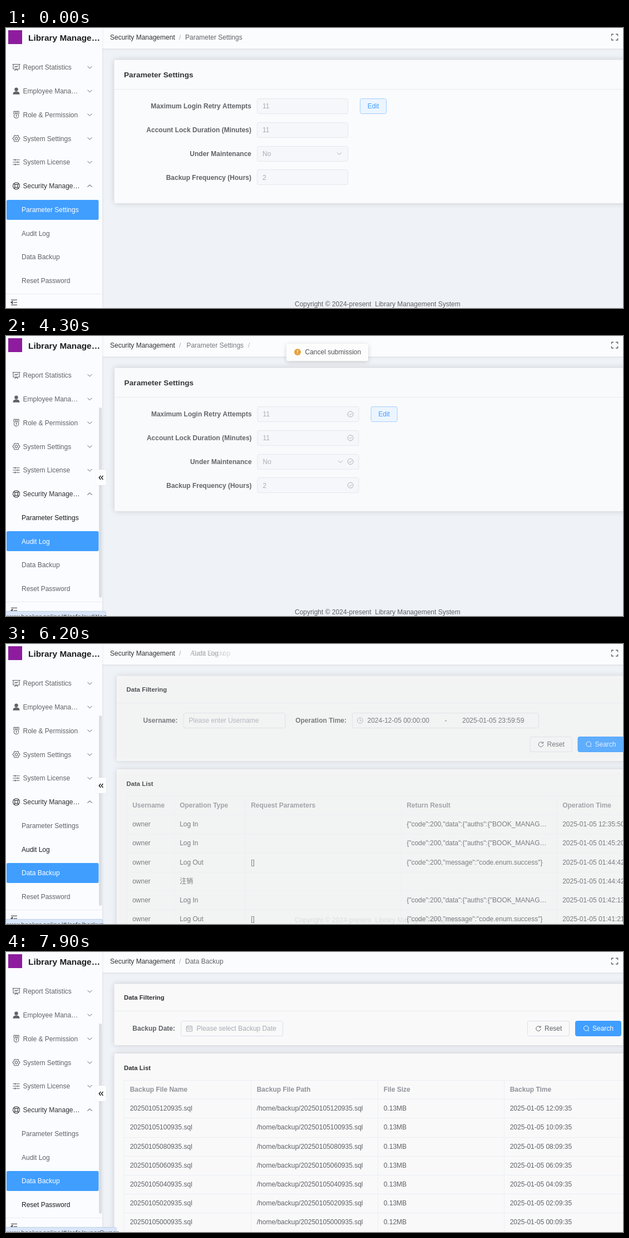
These frames come from a looping animation (1109 px wide and 505 px high, 8000 ms). An HTML page with a canvas:

```html
<!DOCTYPE html>
<html lang="en">
<head>
<meta charset="utf-8">
<title>Parameter Settings</title>
<style>
html, body { margin: 0; width: 100%; height: 100%; overflow: hidden; background: #eff2f6; }
canvas { display: block; width: 1109px; height: 505px; }
</style>
</head>
<body>
<canvas id="stage"></canvas>
<script>
const W = 1109, H = 505, LOOP = 8000, STEP = 100;
const canvas = document.getElementById('stage');
const ctx = canvas.getContext('2d');
const dpr = window.devicePixelRatio || 1;
canvas.width = W * dpr;
canvas.height = H * dpr;

const SANS = '"Liberation Sans", Arial, "Noto Sans CJK SC", "Noto Sans CJK", sans-serif';
const BLUE = '#409eff', INK = '#303133', BODY = '#606266', HINT = '#a8abb2';
const LINE = '#e4e7ed', EDGE = '#dcdfe6', GRID = '#eceef3';

const ICONS = {
  board: 'M-7 -5.5H7M-5.5 -5.5V3H5.5V-5.5M-3 6L0 3L3 6M-3 0L-1 -2L.5 -.5L3 -3',
  user: 'M-3.2 -3a3.2 3.2 0 1 0 6.4 0a3.2 3.2 0 1 0 -6.4 0M-6 6C-6 2 -3.5 .8 0 .8S6 2 6 6Z',
  medal: 'M-4.2 2a4.2 4.2 0 1 0 8.4 0a4.2 4.2 0 1 0 -8.4 0M-4.5 -1V-6.3H4.5V-1M-1.5 -6V-2.5M1.5 -6V-2.5M-1 1L.3 .2V4',
  sliders: 'M-6.2 -4.2H6.2M-6.2 0H6.2M-6.2 4.2H6.2M-2 -5.8V-2.6M2.5 -1.6V1.6M-2 2.6V5.8',
  buoy: 'M-6 0a6 6 0 1 0 12 0a6 6 0 1 0 -12 0M-2.9 0a2.9 2.9 0 1 0 5.8 0a2.9 2.9 0 1 0 -5.8 0M-4.2 -4.2L-2 -2M4.2 -4.2L2 -2M-4.2 4.2L-2 2M4.2 4.2L2 2',
  down: 'M-4 -2L0 2L4 -2',
  up: 'M-4 2L0 -2L4 2',
  check: 'M-5 0a5 5 0 1 0 10 0a5 5 0 1 0 -10 0M-2.4 .1L-.6 1.8L2.5 -1.6',
  clock: 'M-5 0a5 5 0 1 0 10 0a5 5 0 1 0 -10 0M0 -3V.5H2.5',
  calendar: 'M-5 -4H5V5H-5ZM-5 -1H5M-2.5 -5.5V-3M2.5 -5.5V-3M-3 1.8H3',
  reset: 'M3.6 -2.3A4.3 4.3 0 1 0 4.3 .6M4 -5V-2H1',
  search: 'M-4.6 -.4a4.4 4.4 0 1 0 8.8 0a4.4 4.4 0 1 0 -8.8 0M2.8 2.9L4.9 5',
  corners: 'M-5.5 -2V-5.2H-2M2 -5.2H5.5V-2M5.5 2V5.2H2M-2 5.2H-5.5V2',
  fold: 'M-5.5 -4.5H5.5M-1 0H5.5M-5.5 4.5H5.5M-5.5 0L-3 -2V2Z',
  collapse: 'M-.7 -3.5L-3.6 0L-.7 3.5M3.4 -3.5L.5 0L3.4 3.5'
};
// gear outline from a rippled circle
ICONS.gear = 'M-2.2 0a2.2 2.2 0 1 0 4.4 0a2.2 2.2 0 1 0 -4.4 0' +
  Array.from({ length: 49 }, (_, i) => {
    const a = i / 48 * Math.PI * 2, r = 5.6 + .8 * Math.cos(6 * a + Math.PI);
    return (i ? 'L' : 'M') + (r * Math.sin(a)).toFixed(2) + ' ' + (-r * Math.cos(a)).toFixed(2);
  }).join('');
for (const k in ICONS) ICONS[k] = new Path2D(ICONS[k]);

const clamp = v => Math.min(1, Math.max(0, v));

// CSS "ease" curve
function ease(p) {
  p = clamp(p);
  if (p === 0 || p === 1) return p;
  let lo = 0, hi = 1, s = p;
  for (let i = 0; i < 24; i++) {
    s = (lo + hi) / 2;
    const x = .75 * s * (1 - s) ** 2 + .75 * s * s * (1 - s) + s ** 3;
    if (x < p) lo = s; else hi = s;
  }
  return .3 * s * (1 - s) ** 2 + 3 * s * s * (1 - s) + s ** 3;
}

function mix(a, b, k) {
  const at = (c, i) => parseInt(c.slice(i, i + 2), 16);
  return 'rgb(' + [1, 3, 5].map(i => Math.round(at(a, i) + (at(b, i) - at(a, i)) * k)).join() + ')';
}

// y is the middle of the capital letters
function text(str, x, y, color = BODY, { size = 12, bold = false, align = 'left', font = SANS } = {}) {
  ctx.font = (bold ? 'bold ' : '') + size + 'px ' + font;
  ctx.textAlign = align;
  ctx.fillStyle = color;
  ctx.fillText(str, x, Math.round(y + size * .358));
}

function box(x, y, w, h, fill, stroke, r = 3) {
  ctx.beginPath();
  ctx.roundRect(x, y, w, h, r);
  if (fill) { ctx.fillStyle = fill; ctx.fill(); }
  if (stroke) { ctx.strokeStyle = stroke; ctx.lineWidth = 1; ctx.stroke(); }
}

function rect(x, y, w, h, color) {
  ctx.fillStyle = color;
  ctx.fillRect(x, y, w, h);
}

function icon(name, x, y, color = BODY, { fill = false, width = 1 } = {}) {
  ctx.save();
  ctx.translate(x, y);
  ctx.strokeStyle = ctx.fillStyle = color;
  ctx.lineWidth = width;
  if (fill) ctx.fill(ICONS[name]); else ctx.stroke(ICONS[name]);
  ctx.restore();
}

function shadowed(blur, dy, alpha, draw) {
  ctx.save();
  ctx.shadowColor = `rgba(0,0,0,${alpha})`;
  ctx.shadowBlur = blur * dpr;
  ctx.shadowOffsetY = dy * dpr;
  draw();
  ctx.restore();
}

function card(y, bottom, rule, title, size, fill) {
  shadowed(11, 0, .16, () => box(194.5, y, 960, bottom - y, fill, null, 3));
  if (rule) rect(194.5, rule, 960, 1, '#e8ebf0');
  text(title, 212, rule ? (y + rule) / 2 : y + 25.5, INK, { size, bold: true });
}

function button(x, y, w, label, fill, edge, color, glyph) {
  box(x + .5, y + .5, w - 1, 27, fill, edge);
  if (glyph) icon(glyph, x + 20, y + 14, color);
  text(label, glyph ? x + 31 : x + w / 2, y + 14, color, { align: glyph ? 'left' : 'center' });
}

function searchButtons(y) {
  button(937, y, 76, 'Reset', null, EDGE, BODY, 'reset');
  button(1023, y, 83, 'Search', BLUE, BLUE, '#ffffff', 'search');
}

function table(top, cols, heads, rows, pad) {
  const step = 34.2;
  heads.forEach((h, i) => text(h, cols[i] + pad, top + 16.8, '#909399', { bold: true }));
  rows.forEach((row, r) => row.forEach((cell, i) =>
    text(cell, cols[i] + pad, top + 16.8 + step * (r + 1))));
  for (let r = 0; r <= rows.length; r++) rect(212, Math.round(top + step * r), 900, 1, GRID);
  cols.forEach(x => rect(x, top, 1, H - top, GRID));
}

const FIELDS = [
  ['Maximum Login Retry Attempts', '11'],
  ['Account Lock Duration (Minutes)', '11'],
  ['Under Maintenance', 'No'],
  ['Backup Frequency (Hours)', '2']
];

function params(t) {
  const editing = t >= 1200 && t < 2900, wide = t >= 1200;
  const on = ease((t - 1150) / 300) * (1 - ease((t - 2850) / 300));
  const shown = ease((t - 1150) / 500);
  card(57.5, 316, 110, 'Parameter Settings', 13.68, '#fafbfd');
  FIELDS.forEach(([label, value], i) => {
    const y = 141 + 42.75 * i, w = wide ? 183 : 164;
    text(label, 441, y, BODY, { bold: true, align: 'right' });
    if (editing) {
      const left = 441 - ctx.measureText(label).width;
      text('*', left - 8.5, y, '#f56c6c');
    }
    box(451.5, Math.round(y - 14) + .5, w - 1, 27, mix('#f5f7fa', '#fafbfd', on), mix(LINE, EDGE, on));
    text(value, 461, y, mix(HINT, BODY, on));
    if (i === 2) icon('down', wide ? 600.5 : 599, y, HINT);
    if (wide) {
      ctx.save();
      ctx.globalAlpha *= shown;
      icon('check', 618.5, y, HINT);
      ctx.restore();
    }
  });
  if (editing) {
    const rest = ease((t - 1500) / 200);
    const hot = t >= 2600;
    button(654, 127, 66, 'Submit', mix('#79bbff', BLUE, rest), mix('#79bbff', BLUE, rest), '#ffffff');
    button(729, 127, 65, 'Cancel', hot ? '#ecf5ff' : '#fafbfd', hot ? '#c6e2ff' : EDGE, hot ? BLUE : BODY);
  } else {
    const hot = t >= 1000 && t < 1200;
    button(wide ? 655 : 636, 127, 48, 'Edit', hot ? BLUE : '#ecf5ff', hot ? BLUE : '#a0cfff', hot ? '#ffffff' : BLUE);
  }
}

const AUTHS = '{"code":200,"data":{"auths":{"BOOK_MANAG…';
const DONE = '{"code":200,"message":"code.enum.success"}';
const LOGS = [
  ['Log In', '', AUTHS, '12:35:50'],
  ['Log In', '', AUTHS, '01:45:20'],
  ['Log Out', '[]', DONE, '01:44:42'],
  ['注销', '', '', '01:44:42'],
  ['Log In', '', AUTHS, '01:42:13'],
  ['Log Out', '[]', DONE, '01:41:21']
].map(([type, req, res, time]) => ['owner', type, req, res, '2025-01-05 ' + time]);

function audit(t) {
  const fill = '#fafafb';
  card(57.5, 211, 106, 'Data Filtering', 11.4, fill);
  text('Username:', 304, 138, BODY, { bold: true, align: 'right' });
  box(314.5, 124.5, 183, 27, null, EDGE);
  text('Please enter Username', 324, 138, HINT);
  text('Operation Time:', 607.5, 138, BODY, { bold: true, align: 'right' });
  box(618, 124.5, 335, 27, null, EDGE);
  icon('clock', 632, 138, HINT);
  text('2024-12-05 00:00:00', 645, 138);
  text('-', 784, 138);
  text('2025-01-05 23:59:59', 815.5, 138);
  searchButtons(167);

  card(226, 560, 0, 'Data List', 11.4, fill);
  table(274, [212, 297, 425, 705, 985],
    ['Username', 'Operation Type', 'Request Parameters', 'Return Result', 'Operation Time'], LOGS, 10.7);

  const veil = 1 - ease((t - 4840) / 300);
  if (veil > 0) {
    ctx.save();
    ctx.globalAlpha *= veil * .9;
    rect(194.5, 226, 960, 300, fill);
    ctx.restore();
    ctx.save();
    ctx.globalAlpha *= Math.min(1, veil * 3);
    const turn = (t - 5000) / 2000 * Math.PI * 2;
    ctx.beginPath();
    ctx.arc(672.5, 482, 17, 2.5 + turn, 4.1 + turn);
    ctx.strokeStyle = BLUE;
    ctx.lineWidth = 2;
    ctx.lineCap = 'round';
    ctx.stroke();
    ctx.restore();
  }
}

const BACKUPS = [12, 10, 8, 6, 4, 2, 0].map(h => {
  const hh = String(h).padStart(2, '0'), file = `20250105${hh}0935.sql`;
  return [file, '/home/backup/' + file, h ? '0.13MB' : '0.12MB', `2025-01-05 ${hh}:09:35`];
});

function backup() {
  const fill = '#f9f9fa';
  card(57.5, 168, 106, 'Data Filtering', 11.4, fill);
  text('Backup Date:', 304, 138, BODY, { bold: true, align: 'right' });
  box(314.5, 124.5, 183, 27, null, EDGE);
  icon('calendar', 329.5, 138, HINT);
  text('Please select Backup Date', 342.5, 138, HINT);
  searchButtons(124);
  card(183, 560, 0, 'Data List', 11.4, fill);
  table(231, [212, 440, 668, 895],
    ['Backup File Name', 'Backup File Path', 'File Size', 'Backup Time'], BACKUPS, 10.7);
}

const FAR = 99999;
const PAGES = [
  { name: 'Parameter Settings', draw: params, crumbIn: -FAR, enter: -FAR, crumbOut: 4262, leave: 4285 },
  { name: 'Audit Log', draw: audit, crumbIn: 4302, enter: 4700, crumbOut: 6105, leave: 6145 },
  { name: 'Data Backup', draw: backup, crumbIn: 6145, enter: 6690, crumbOut: FAR, leave: FAR }
];

function drawPages(t) {
  for (const p of PAGES) {
    const shown = ease((t - p.enter) / 500), gone = ease((t - p.leave) / 380);
    if (shown === 0 || gone === 1) continue;
    ctx.save();
    ctx.beginPath();
    ctx.rect(174, 38, W, H);
    ctx.clip();
    ctx.globalAlpha = shown * (1 - gone);
    ctx.translate((gone - 1 + shown) * 25.6, 0);
    p.draw(t);
    ctx.restore();
  }
}

function drawHeader(t) {
  shadowed(4, 1, .09, () => rect(173, 0, W, 37, '#fbfcfe'));
  text('Security Management', 187, 17, INK);
  text('/', 311, 17, HINT);
  for (const p of PAGES) {
    const shown = ease((t - p.crumbIn) / 300), gone = ease((t - p.crumbOut) / 300);
    if (shown === 0 || gone === 1) continue;
    ctx.save();
    ctx.globalAlpha = shown * (1 - gone);
    ctx.translate((1 - shown + gone) * 17.1, 0);
    text(p.name, 322, 17);
    if (gone > 0) text('/', 322 + ctx.measureText(p.name).width + 8, 17, HINT);
    ctx.restore();
  }
  icon('corners', 1094, 16.5, BODY, { width: 1.4 });
}

const MENU = [
  ['board', 'Report Statistics'], ['user', 'Employee Mana…'], ['medal', 'Role & Permission'],
  ['gear', 'System Settings'], ['sliders', 'System License'], ['buoy', 'Security Manage…']
];
const LINKS = ['Parameter Settings', 'Audit Log', 'Data Backup', 'Reset Password'];

function drawSidebar(t) {
  shadowed(4, 0, .1, () => rect(0, 0, 173, H, '#fafcff'));
  box(4, 4, 25, 25, '#8d1d9e', null, 0);
  text('Library Manage…', 40, 17, '#1d1e1f', { size: 15.39, bold: true });

  MENU.forEach(([glyph, label], i) => {
    const y = 71 + 42.75 * i, color = i === 5 ? INK : BODY;
    icon(glyph, 18.5, y, color, { fill: glyph === 'user', width: 1.1 });
    text(label, 30.5, y, color);
    icon(i === 5 ? 'up' : 'down', 150.5, y, color);
  });

  const active = t < 4250 ? 0 : t < 6110 ? 1 : 2;
  const hover = t < 3700 ? -1 : t < 5500 ? 1 : t < 7800 ? 2 : 3;
  const fresh = t - (active === 1 ? 4262 : 6105) < 250;
  LINKS.forEach((label, i) => {
    const y = 327.5 + 42.75 * i;
    if (i === active) box(1, Math.round(y - 18), 165.5, 36, BLUE, null, 2.5);
    const dark = i === hover || (active > 0 && fresh && i === active - 1);
    text(label, 28, y, i === active ? '#ffffff' : dark ? '#1b1c1e' : BODY);
  });

  rect(0, 479, 173, 1, '#e9ecf0');
  icon('fold', 14.5, 495, INK, { width: 1.2 });

  const tools = ease((t - 3650) / 200);
  if (tools > 0) {
    ctx.save();
    ctx.globalAlpha = tools;
    box(167, 129, 5.5, 343, '#dcdee1', null, 2.7);
    shadowed(2, 0, .08, () => box(162, 241, 18, 28, '#fcfdfe', null, 3));
    icon('collapse', 171, 255.5, '#1d1e1f', { width: 1.5 });
    ctx.restore();
  }
}

function drawStatus(t) {
  if (t < 3700) return;
  const [page, w] = t < 5600 ? ['auditlog', 180] : t < 7800 ? ['backup', 174.5] : ['superOwner', 199];
  box(-4, 496.5, w + 3.5, 20, '#d9e5f8', '#c3d0e6', 3);
  text('www.booker.online/#/safe/' + page, -1, 506, '#44474c',
    { size: 11, font: '"Open Sans", "Noto Sans", sans-serif' });
}

function drawMessage(t) {
  const k = ease((t - 2850) / 300) * (1 - ease((t - 4895) / 300));
  if (k === 0) return;
  ctx.save();
  ctx.globalAlpha = k;
  ctx.translate(0, (k - 1) * 31);
  shadowed(9, 2, .16, () => box(504, 14, 147, 31, '#fdfdfd', null, 3));
  ctx.beginPath();
  ctx.arc(524, 29, 6, 0, Math.PI * 2);
  ctx.fillStyle = '#e6a23c';
  ctx.fill();
  rect(523.4, 25.5, 1.2, 4.4, '#ffffff');
  rect(523.4, 31, 1.2, 1.3, '#ffffff');
  text('Cancel submission', 537.5, 29, '#505256');
  ctx.restore();
}

function draw(t) {
  ctx.setTransform(dpr, 0, 0, dpr, 0, 0);
  rect(0, 0, W, H, '#eff2f6');
  text('Copyright © 2024-present  Library Management System', 519, 498);
  drawPages(t);
  drawHeader(t);
  drawSidebar(t);
  drawStatus(t);
  drawMessage(t);
}

const start = performance.now();
function tick() {
  const t = (performance.now() - start) % LOOP;
  draw(Math.floor(t / STEP) * STEP);
  requestAnimationFrame(tick);
}
tick();
</script>
</body>
</html>
```
